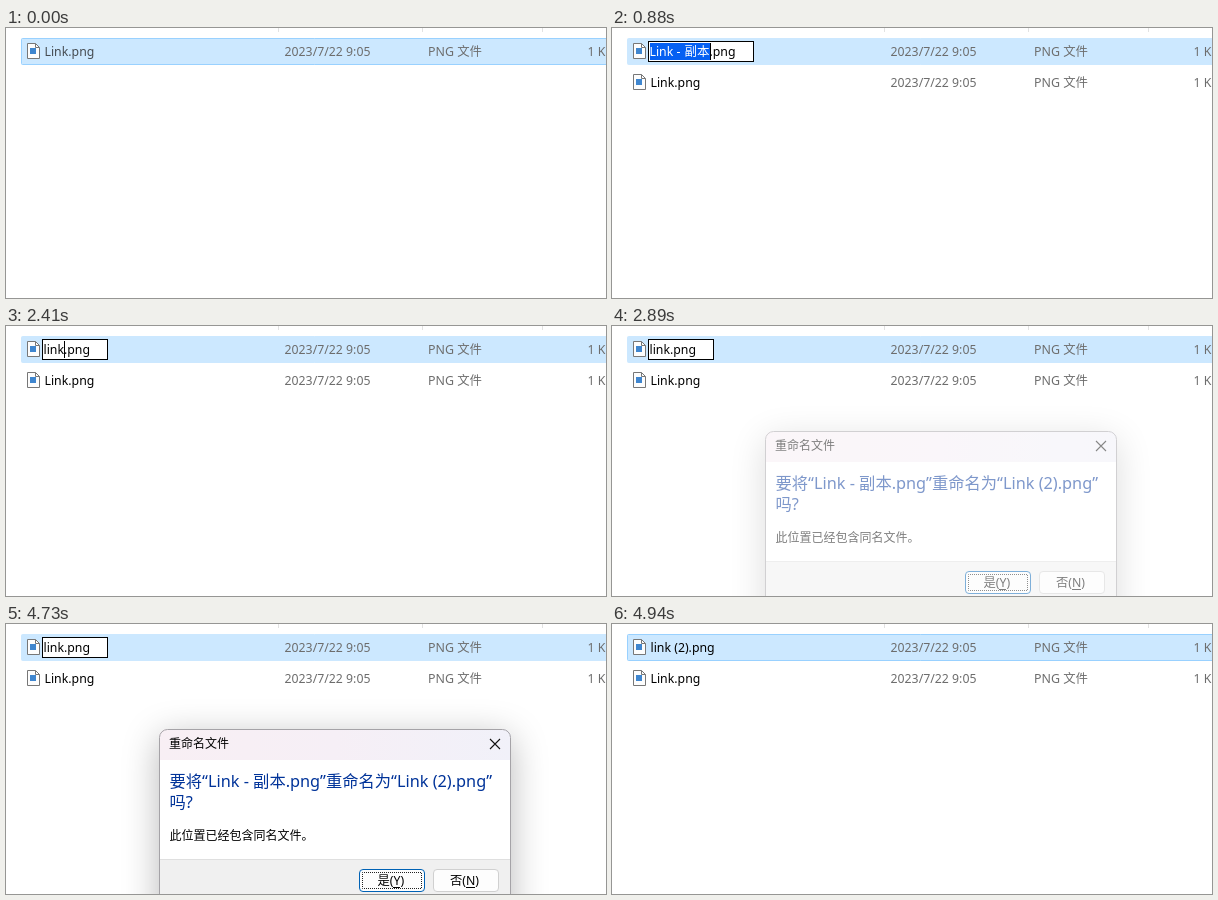
Animation, 600 px wide and 270 px high, one loop 5550 ms. Source, as an HTML page with a canvas:

```html
<!DOCTYPE html>
<html lang="zh-CN">
<head>
<meta charset="utf-8">
<title>重命名文件</title>
<style>
html, body { margin: 0; width: 600px; height: 270px; overflow: hidden; background: #fff; }
canvas { display: block; }
</style>
</head>
<body>
<canvas id="stage" width="600" height="270"></canvas>
<script>
const LOOP = 5550;
const FONT = '"Noto Sans", "Noto Sans CJK SC", "Noto Sans CJK", sans-serif';
const stage = document.getElementById('stage').getContext('2d');
const layer = document.createElement('canvas');
layer.width = 600;
layer.height = 270;
const dialog = layer.getContext('2d');

// Typed names with the time each one appears
const typing = [[810, 'Link - 副本'], [1800, 'l'], [2000, 'li'], [2200, 'lin'], [2410, 'link']];

function text(c, s, x, y, color = '#000', size = 12.3) {
  c.font = size + 'px ' + FONT;
  c.fillStyle = color;
  c.fillText(s, x, y);
  return c.measureText(s).width;
}

function box(c, x, y, w, h, fill, line) {
  c.fillStyle = line || fill;
  c.fillRect(x, y, w, h);
  if (line) {
    c.fillStyle = fill;
    c.fillRect(x + 1, y + 1, w - 2, h - 2);
  }
}

function round(c, x, y, w, h, r, fill, line) {
  c.beginPath();
  c.roundRect(x, y, w, h, r);
  c.fillStyle = fill;
  c.fill();
  if (line) {
    c.strokeStyle = line;
    c.lineWidth = 1;
    c.stroke();
  }
}

function icon(x, y) {
  const c = stage;
  c.beginPath();
  c.moveTo(x + .5, y + .5);
  c.lineTo(x + 8.5, y + .5);
  c.lineTo(x + 12.5, y + 4.5);
  c.lineTo(x + 12.5, y + 15.5);
  c.lineTo(x + .5, y + 15.5);
  c.closePath();
  c.fillStyle = '#fdfdfd';
  c.fill();
  c.strokeStyle = '#777';
  c.lineWidth = 1;
  c.stroke();
  c.beginPath();
  c.moveTo(x + 8.5, y + .5);
  c.lineTo(x + 8.5, y + 4.5);
  c.lineTo(x + 12.5, y + 4.5);
  c.stroke();
  box(c, x + 3, y + 5, 6, 6, '#3f86cf');
}

function details(y) {
  const gray = '#6d6d6d';
  icon(21, y - 13);
  text(stage, '2023/7/22 9:05', 278.5, y, gray);
  text(stage, 'PNG 文件', 422, y, gray, 12.4);
  text(stage, '1 KB', 581.5, y, gray);
}

function copyName(x, color) {
  text(stage, 'Link - ', x, 28, color);
  text(stage, '副本', x + 35, 28, color, 12.5);
  text(stage, '.png', x + 60, 28);
}

function editor(t) {
  const [since, name] = typing.filter(k => k[0] <= t).pop();
  const first = since === 810;
  stage.font = '12.3px ' + FONT;
  const end = first ? 98 : Math.floor(38 + stage.measureText(name).width);
  box(stage, 36, 13, end + 44 - 36, 21, '#fff', '#000');
  if (first) {
    box(stage, 38, 15, 60, 17, '#0560f2');
    copyName(37.5, '#fff');
  } else {
    text(stage, name + '.png', 37.5, 28);
  }
  const hidden = (t >= 1330 && t < 1480) || t >= 2890;
  if (!hidden) box(stage, end, 15, 1, 17, '#000');
}

function button(x, label, key, focus) {
  const c = dialog;
  round(c, x + .5, 245.5, 65, 22, 3.5, '#fdfdfd', focus ? '#0062b5' : '#d0d0d0');
  if (focus) {
    c.setLineDash([1, 1]);
    c.lineDashOffset = .5;
    c.strokeStyle = '#222';
    c.strokeRect(x + 3.5, 248.5, 59, 16);
    c.setLineDash([]);
  }
  let pen = x + (focus ? 18.5 : 17);
  pen += text(c, label + '(', pen, 261);
  const w = text(c, key, pen, 261);
  box(c, Math.round(pen), 263, Math.round(w), 1, '#000');
  text(c, ')', pen + w, 261);
}

function drawDialog() {
  const c = dialog;
  c.clearRect(0, 0, 600, 270);
  c.save();
  c.shadowColor = 'rgba(0,0,0,.28)';
  c.shadowBlur = 36;
  c.shadowOffsetY = 8;
  round(c, 153, 105, 352, 200, 8, '#fff');
  c.restore();

  c.save();
  c.beginPath();
  c.roundRect(153, 105, 352, 200, 8);
  c.clip();
  const bar = c.createLinearGradient(153, 0, 505, 0);
  bar.addColorStop(0, '#f8eff4');
  bar.addColorStop(.5, '#f6eff6');
  bar.addColorStop(1, '#f1f1f9');
  box(c, 153, 105, 352, 31, bar);
  box(c, 153, 136, 352, 99, '#fff');
  box(c, 153, 235, 352, 70, '#f0f0f0');
  box(c, 153, 235, 352, 1, '#dfdfdf');
  c.restore();
  c.beginPath();
  c.roundRect(153.5, 105.5, 351, 200, 8);
  c.strokeStyle = '#a5a3a7';
  c.lineWidth = 1;
  c.stroke();

  text(c, '重命名文件', 163, 124, '#000', 12);
  c.strokeStyle = '#111';
  c.lineWidth = 1.1;
  c.beginPath();
  c.moveTo(484, 115);
  c.lineTo(494, 125);
  c.moveTo(494, 115);
  c.lineTo(484, 125);
  c.stroke();
  text(c, '要将“Link - 副本.png”重命名为“Link (2).png”', 163.5, 163, '#003399', 16.3);
  text(c, '吗?', 163.5, 184, '#003399', 16.3);
  text(c, '此位置已经包含同名文件。', 163.5, 216, '#000', 12);
  button(353, '是', 'Y', true);
  button(427, '否', 'N', false);
}

function dialogAlpha(t) {
  if (t < 2890) return 0;
  if (t < 2950) return .5;
  if (t < 4820) return 1;
  if (t < 4880) return .5;
  return t < 4940 ? .12 : 0;
}

function draw(t) {
  const c = stage;
  box(c, 0, 0, 600, 270, '#fff');
  for (const x of [272, 416, 536]) box(c, x, 0, 1, 4, '#e2e2e2');

  const editing = t >= 810 && t < 4820;
  const framed = t < 880 || t >= 4820;
  round(c, 15.5, 10.5, 600, 26, 1, '#cce8ff', framed ? '#99d1ff' : '#cce8ff');
  details(28);
  if (t >= 330) {
    details(59);
    text(c, 'Link.png', 38.5, 59);
  }

  if (t < 330) text(c, 'Link.png', 38.5, 28, '#464c52');
  else if (editing) editor(t);
  else if (t < 810) copyName(38.5, '#000');
  else text(c, 'link (2).png', 38.5, 28);

  const alpha = dialogAlpha(t);
  if (alpha) {
    drawDialog();
    c.globalAlpha = alpha;
    c.drawImage(layer, 0, 0);
    c.globalAlpha = 1;
  }
}

const start = performance.now();
function tick() {
  draw((performance.now() - start) % LOOP);
  requestAnimationFrame(tick);
}
tick();
</script>
</body>
</html>
```
